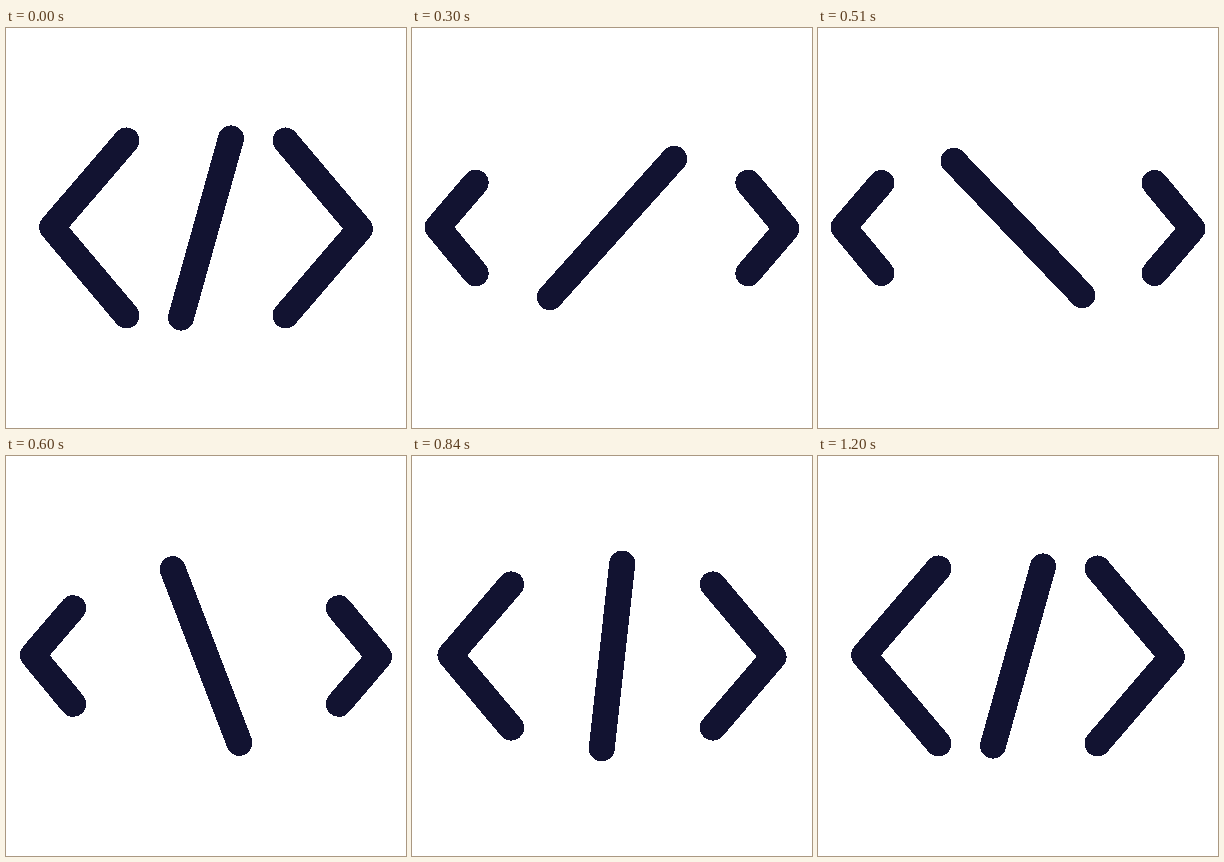
An HTML page for the animation above (3230 ms loop, 400x400 px).

```html
<!DOCTYPE html>
<html lang="en">
<head>
<meta charset="utf-8">
<title>Code icon</title>
<style>
  html, body { margin: 0; height: 100%; overflow: hidden; background: #fff; }
  svg { display: block; width: 100%; height: 100%; }
</style>
</head>
<body>
<svg viewBox="0 0 400 400" fill="none" stroke="#121331" stroke-width="26"
     stroke-linecap="round" stroke-linejoin="round" shape-rendering="crispEdges">
  <path id="left"/>
  <path id="right" transform="rotate(180 200 200)"/>
  <path id="slash" d="M200 107V293"/>
</svg>
<script>
const LOOP = 3230, STEP = 30, LAST = 40, TURN = 13;
const [left, right, slash] = ["left", "right", "slash"].map(id => document.getElementById(id));

// Cubic Bezier easing with control points (a, 0) and (b, 1)
function ease(x, a, b) {
  if (x <= 0) return 0;
  if (x >= 1) return 1;
  let lo = 0, hi = 1;
  for (let i = 0; i < 30; i++) {
    const u = (lo + hi) / 2, v = 1 - u;
    if (3 * u * v * v * a + 3 * u * u * v * b + u * u * u < x) lo = u;
    else hi = u;
  }
  return lo * lo * (3 - 2 * lo);
}

function draw(now) {
  const n = Math.min(LAST, Math.floor((now % LOOP) / STEP));

  const angle = 15.6 + 180 * ease(n / LAST, 0.533, 0.106);
  slash.setAttribute("transform", `rotate(${angle} 200 200)`);

  // Brackets shrink outwards, then grow back
  const p = n < TURN
    ? ease(n / TURN, 0.55, 0.12)
    : 1 - ease((n - TURN) / (LAST - TURN), 0.6, 0.4);
  const h = 87.5 - 43.5 * p, x = 120.5 - 58.5 * p, tip = 46 - 21 * p;
  const d = `M${x} ${200 - h}L${tip} 199.2L${x} ${200 + h}`;
  left.setAttribute("d", d);
  right.setAttribute("d", d);
}

const start = performance.now();
function tick() {
  draw(performance.now() - start);
  requestAnimationFrame(tick);
}
tick();
</script>
</body>
</html>
```
